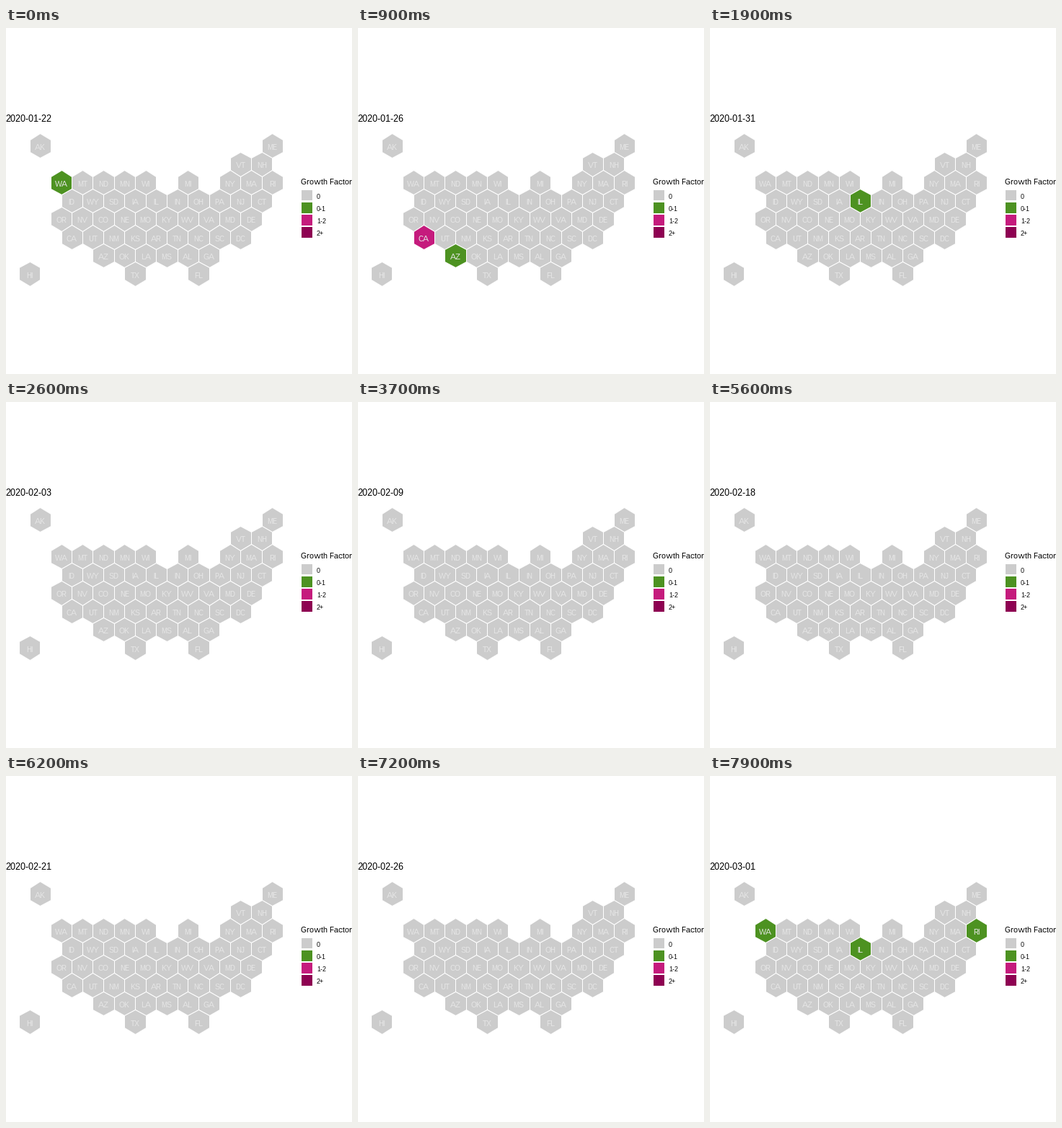
Animation of 480x480 px, one loop 8 s. Source, as a matplotlib script:

```python
import numpy as np
import matplotlib.pyplot as plt
from matplotlib.animation import FuncAnimation
from matplotlib.patches import Polygon, Rectangle

# Whole-pixel glyph widths, as on a screen device
plt.rcParams.update({
    "font.family": "Liberation Sans",
    "text.hinting": "default",
    "text.hinting_factor": 1,
})

SIZE, DPI = 480, 72          # at 72 dpi one point is one pixel
FRAMES, INTERVAL = 80, 100
START = np.datetime64("2020-01-22")

LEVELS = {"0": "#CCCCCC", "0-1": "#4D9221", "1-2": "#C51B7D", "2+": "#8E0152"}
NONE, LOW, MID, HIGH = LEVELS.values()

# First half-column of each row, then the tiles two half-columns apart
ROWS = [
    (0, "AK .. .. .. .. .. .. .. .. .. .. ME"),
    (19, "VT NH"),
    (2, "WA MT ND MN WI .. MI .. NY MA RI"),
    (3, "ID WY SD IA IL IN OH PA NJ CT"),
    (2, "OR NV CO NE MO KY WV VA MD DE"),
    (3, "CA UT NM KS AR TN NC SC DC"),
    (6, "AZ OK LA MS AL GA"),
    (-1, "HI .. .. .. .. TX .. .. FL"),
]
X0, Y0, DX = 47.3, 163.4, 14.64
R = DX / np.cos(np.pi / 6)

# Days since START on which a state is not grey
GROWTH = {
    0: {"WA": LOW},
    2: {"IL": LOW},
    4: {"AZ": LOW, "CA": MID},
    6: {"CA": LOW},
    8: {"CA": LOW},
    9: {"IL": LOW},
    10: {"MA": LOW},
    12: {"CA": HIGH},
    20: {"CA": LOW},
    22: {"CA": LOW},
    27: {"CA": LOW},
    30: {"CA": MID},
    33: {"CA": LOW},
    35: {"CA": LOW},
    37: {"CA": LOW},
    38: {"WA": HIGH},
    39: {"WA": LOW, "IL": LOW, "RI": LOW},
}

fig = plt.figure(figsize=(SIZE / DPI, SIZE / DPI), dpi=DPI, facecolor="white")
ax = fig.add_axes([0, 0, 1, 1])
ax.set_xlim(0, SIZE)
ax.set_ylim(SIZE, 0)
ax.axis("off")


def label(x, y, text, size, color="black", ha="left"):
    return ax.text(x, y, text, fontsize=size, color=color, ha=ha, va="baseline")


def hexagon(x, y):
    a = np.radians(np.arange(30, 390, 60))
    pts = np.column_stack([x + R * np.cos(a), y + R * np.sin(a)])
    # Corners on pixel centres keep the upright borders one pixel wide
    return ax.add_patch(Polygon(np.round(pts) + 0.5, facecolor=NONE,
                                edgecolor="white", linewidth=1))


tiles = {}
for row, (first, names) in enumerate(ROWS):
    y = Y0 + 1.5 * R * row
    for i, name in enumerate(names.split()):
        if name != "..":
            x = X0 + DX * (first + 2 * i)
            tiles[name] = hexagon(x, y)
            label(x, y + 5.6, name, 11, "#E5E5E5", "center")

label(409, 217, "Growth Factor", 11)
for i, (name, color) in enumerate(LEVELS.items()):
    top, bottom = int(225.05 + 17.28 * i), int(239.85 + 17.28 * i)
    ax.add_patch(Rectangle((410, top), 15, bottom - top,
                           facecolor=color, linewidth=0))
    label(431, top + 12, name, 9)

title = label(-1, 130, "", 13)


def update(frame):
    # Colours switch one frame ahead of the date
    growth = GROWTH.get(frame // 2, {})
    for name, tile in tiles.items():
        tile.set_facecolor(growth.get(name, NONE))
    title.set_text(str(START + max(0, (frame - 1) // 2)))
    return [title, *tiles.values()]


anim = FuncAnimation(fig, update, frames=FRAMES, interval=INTERVAL,
                     repeat=True, repeat_delay=0, blit=False)
plt.show()
```
